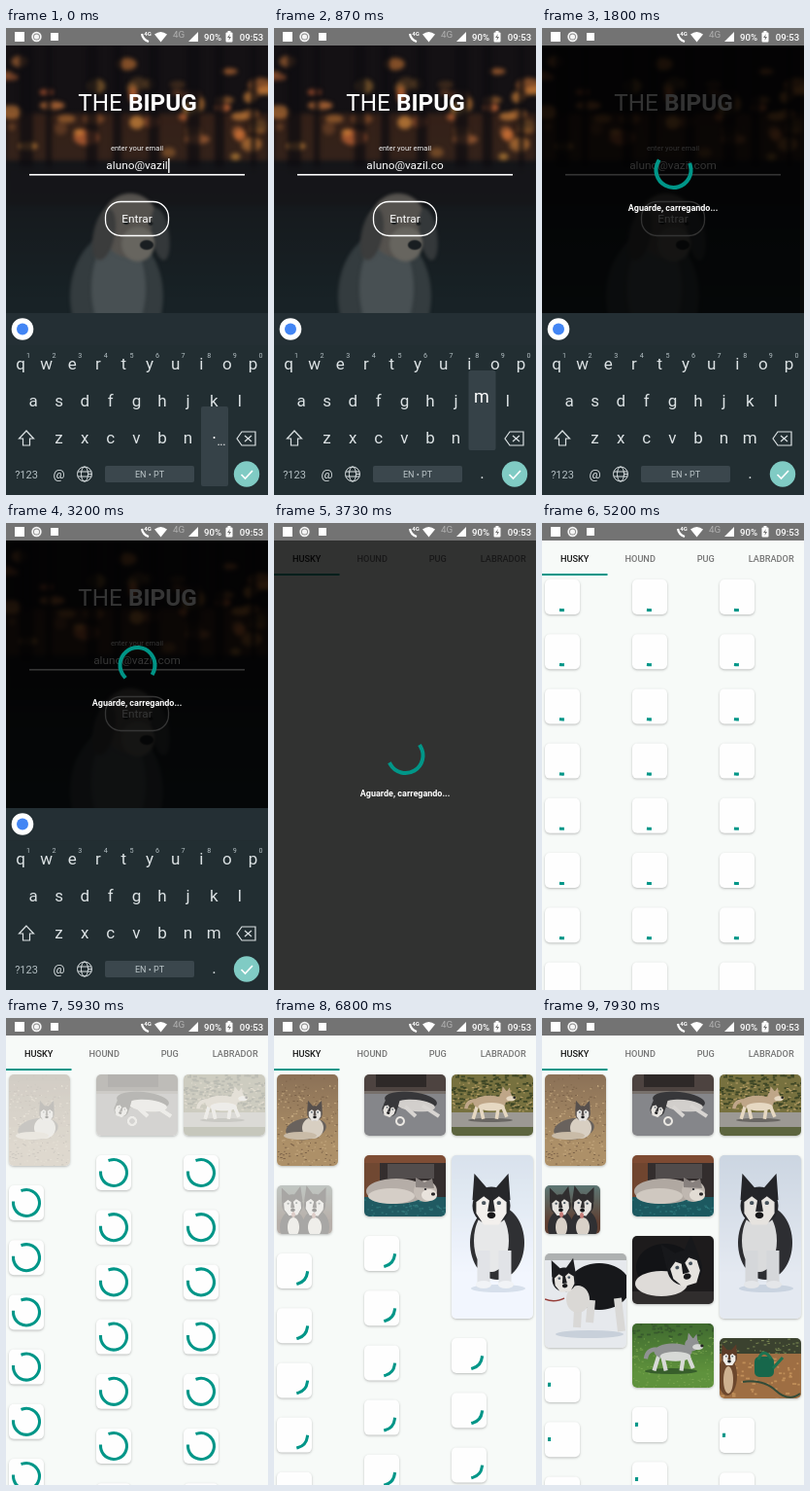
Write an HTML page with a canvas that moves like this. It is 270 by 480 pixels and loops after 8000 ms.

```html
<!DOCTYPE html>
<html lang="pt">
<head>
<meta charset="utf-8">
<title>Dog gallery</title>
<style>
html, body { margin: 0; width: 100%; height: 100%; overflow: hidden; background: #000; }
canvas { display: block; width: 270px; height: 480px; }
</style>
</head>
<body>
<canvas id="stage"></canvas>
<script>
const W = 270, H = 480, LOOP = 8000, TEAL = '#009688';
const dpr = window.devicePixelRatio || 1;
const stage = document.getElementById('stage');
stage.width = W * dpr;
stage.height = H * dpr;
const screen = stage.getContext('2d');
screen.scale(dpr, dpr);
let g = screen;

const clamp = v => Math.max(0, Math.min(1, v));
const ramp = (t, a, b) => clamp((t - a) / (b - a));

// cubic-bezier(.4, 0, .2, 1)
function ease(x) {
  let lo = 0, hi = 1;
  for (let i = 0; i < 18; i++) {
    const s = (lo + hi) / 2, r = 1 - s;
    if (1.2 * r * r * s + 0.6 * r * s * s + s * s * s < x) lo = s; else hi = s;
  }
  return lo * lo * (3 - 2 * lo);
}

function random(seed) {
  return () => (seed = (seed * 16807) % 2147483647) / 2147483647;
}

// drawing helpers
function rect(x, y, w, h, color) {
  g.fillStyle = color;
  g.fillRect(x, y, w, h);
}
function round(x, y, w, h, r, color) {
  g.beginPath();
  g.roundRect(x, y, w, h, r);
  g.fillStyle = color;
  g.fill();
}
function oval(x, y, rx, ry, color, tilt = 0) {
  g.beginPath();
  g.ellipse(x, y, rx, ry, tilt, 0, 7);
  g.fillStyle = color;
  g.fill();
}
function fillPath(d, color) {
  g.fillStyle = color;
  g.fill(new Path2D(d));
}
function line(d, color, width = 1.2) {
  g.strokeStyle = color;
  g.lineWidth = width;
  g.stroke(new Path2D(d));
}
function text(str, x, y, size, color, weight = 400, align = 'center') {
  g.font = `${weight} ${size}px Roboto, sans-serif`;
  g.textAlign = align;
  g.textBaseline = 'middle';
  g.fillStyle = color;
  g.fillText(str, x, y + 0.5);
}
function fade(top, bottom, y0, y1) {
  const grad = g.createLinearGradient(0, y0, 0, y1);
  grad.addColorStop(0, top);
  grad.addColorStop(1, bottom);
  return grad;
}
function arc(x, y, r, width, from, sweep) {
  const a = (from - 90) * Math.PI / 180;
  g.beginPath();
  g.arc(x, y, r, a, a + sweep * Math.PI / 180);
  g.lineCap = 'square';
  g.strokeStyle = TEAL;
  g.lineWidth = width;
  g.stroke();
  g.lineCap = 'butt';
}
function specks(n, color, x, y, w, h, seed, size = 2) {
  const rnd = random(seed);
  for (let i = 0; i < n; i++) rect(x + rnd() * w, y + rnd() * h, size * (0.5 + rnd()), size * 0.6, color);
}
function picture(w, h, paint) {
  const c = document.createElement('canvas');
  c.width = w * 2;
  c.height = h * 2;
  const last = g;
  g = c.getContext('2d');
  g.scale(2, 2);
  paint();
  g = last;
  return c;
}

// indeterminate ring: the head runs ahead, then the tail catches up
function ring(x, y, r, width, cycles, max, turn, offset) {
  const n = Math.floor(cycles), f = cycles - n;
  const head = max * ease(clamp(f * 2)), tail = max * ease(clamp(f * 2 - 1));
  arc(x, y, r, width, offset + turn * cycles + max * n + tail, head - tail + 3.6);
}

// login background
const photo = picture(270, 462, () => {
  rect(0, 0, 270, 462, fade('#141114', '#182226', 60, 260));
  const rnd = random(77);
  g.filter = 'blur(5px)';
  rect(0, 70, 270, 48, 'rgba(100,56,30,.4)');
  for (let i = 0; i < 46; i++) {
    const x = rnd() * 270, y = 12 + (rnd() + rnd()) * 55;
    oval(x, y, 4 + rnd() * 9, 3 + rnd() * 5, `rgba(${185 + rnd() * 45 | 0},${105 + rnd() * 35 | 0},58,${0.2 + rnd() * 0.6})`);
  }
  for (let i = 0; i < 8; i++) rect(i * 35 + rnd() * 14, 0, 5 + rnd() * 9, 130, 'rgba(14,12,16,.75)');
  rect(0, 124, 270, 40, 'rgba(22,22,25,.8)');
  g.filter = 'blur(3px)';
  oval(114, 258, 48, 66, '#343c3f');
  oval(116, 250, 28, 55, '#485053');
  oval(128, 185, 30, 33, '#55524e');
  oval(101, 194, 11, 27, '#3b3c3c', 0.2);
  oval(159, 194, 9, 27, '#34383a', -0.15);
  oval(136, 204, 17, 18, '#67655f');
  g.filter = 'blur(1px)';
  oval(145, 205, 7, 5, '#191e21');
  oval(124, 182, 3, 2, '#1a1d1f');
  oval(149, 183, 2.5, 2, '#1a1d1f');
  g.filter = 'none';
});

// thumbnails
function face(x, y, s, dark = '#292a2d', tilt = 0) {
  g.save();
  g.translate(x, y);
  g.rotate(tilt);
  g.scale(s, s);
  fillPath('M-10-3L-9-17L-2-9L2-9L9-17L10-3Z', dark);
  oval(0, 0, 10, 10, dark);
  fillPath('M0-2L4-5L8-2L8 4L4 10L-4 10L-8 4L-8-2L-4-5Z', '#e6e3df');
  fillPath('M0-9L2 3L-2 3Z', dark);
  oval(-4, -1.5, 1.1, 1, '#46525c');
  oval(4, -1.5, 1.1, 1, '#46525c');
  oval(0, 5, 2.2, 1.7, '#18181a');
  g.restore();
}
function walker(x, y, s, coat, belly) {
  g.save();
  g.translate(x, y);
  g.scale(s, s);
  line('M-12 3L-16 16M-9 3L-6 16M9 3L7 16M12 2L17 14', belly, 3.4);
  oval(0, 0, 16, 7, coat);
  oval(2, 4, 13, 4, belly);
  line('M-14-2Q-22-2-23 6', coat, 3.5);
  oval(16, -6, 6, 5.5, coat);
  fillPath('M12-9L13-16L17-11L20-15L21-7Z', coat);
  oval(21, -4, 4.5, 2.5, belly);
  oval(24.5, -5, 1.3, 1.2, '#242424');
  g.restore();
}

const paints = {
  field() {
    rect(0, 0, 63, 94, fade('#8b7157', '#ad9068', 0, 70));
    specks(150, '#c6aa80', 0, 10, 63, 84, 5, 1.6);
    specks(130, '#7a6148', 0, 0, 63, 94, 9, 1.6);
    oval(30, 56, 21, 11, '#69625d', -0.15);
    oval(37, 55, 11, 11, '#d8cfc2');
    oval(24, 63, 17, 4, '#c9bba7');
    face(39, 40, 0.78, '#57504d');
  },
  floor() {
    rect(0, 0, 84, 63, '#85868a');
    rect(0, 0, 84, 20, '#4d4340');
    rect(12, 0, 52, 13, '#2e2928');
    rect(0, 17, 84, 3, '#77706b');
    oval(48, 27, 27, 9, '#37373a', 0.1);
    oval(53, 32, 20, 6, '#d2cfcc', 0.1);
    line('M60 32L77 43M42 33L53 43', '#d8d5d2', 4);
    face(26, 36, 0.75, '#37373a', 0.35);
    g.beginPath();
    g.arc(37, 48, 4, 0, 7);
    g.strokeStyle = '#ece9e4';
    g.lineWidth = 2;
    g.stroke();
  },
  road() {
    rect(0, 0, 84, 63, '#77713f');
    specks(150, '#3f4726', 0, 0, 84, 34, 11, 3);
    specks(100, '#b39c64', 0, 8, 84, 32, 18, 2);
    rect(0, 39, 84, 24, '#9c9994');
    rect(0, 54, 84, 9, '#5d653f');
    oval(40, 47, 23, 2, '#696663');
    walker(39, 29, 1.05, '#bfa688', '#e6d8c2');
  },
  sofa() {
    rect(0, 0, 84, 63, '#332d2d');
    rect(0, 0, 84, 8, '#7d4a32');
    rect(0, 8, 16, 37, '#70452f');
    rect(24, 9, 48, 15, '#504b4b');
    rect(0, 43, 84, 20, '#1c5960');
    specks(60, '#2c7579', 0, 45, 84, 18, 23);
    oval(33, 37, 31, 13, '#b0a8a1');
    oval(28, 42, 24, 8, '#cfc8c0');
    oval(63, 37, 12, 11, '#bfb7b0');
    fillPath('M53 33L53 23L62 28L70 24L72 34Z', '#88817e');
    oval(67, 41, 8, 6, '#e2dcd4');
    oval(71, 40, 2, 1.6, '#272527');
    oval(63, 35, 1.2, 1, '#29292d');
  },
  snow() {
    rect(0, 0, 84, 168, fade('#ccd6e2', '#e4e9f1', 0, 120));
    oval(48, 137, 28, 4, '#c9d3e0');
    oval(47, 90, 28, 38, '#2d2e32');
    oval(41, 88, 18, 32, '#dadbdc');
    line('M33 98L33 132M55 98L55 132', '#d5d7da', 13);
    oval(33, 133, 8, 4, '#e4e6e9');
    oval(56, 133, 8, 4, '#e4e6e9');
    face(41, 52, 1.95, '#242529');
  },
  pair() {
    rect(0, 0, 57, 50, fade('#5d7775', '#5f3f32', 0, 38));
    oval(16, 43, 13, 17, '#303033');
    oval(40, 43, 14, 18, '#303033');
    oval(17, 43, 6, 10, '#d9d1c8');
    oval(39, 43, 7, 10, '#d9d1c8');
    face(16, 20, 1.08, '#302e2f', -0.08);
    face(39, 20, 1.12, '#302e2f', 0.08);
    oval(17, 30, 2, 3, '#c77d79');
    oval(38, 31, 2, 3, '#c77d79');
  },
  winter() {
    rect(0, 0, 84, 97, '#e6e9ed');
    rect(0, 0, 84, 7, '#aeb1b1');
    oval(46, 83, 35, 4, '#c8d0da');
    oval(56, 34, 32, 24, '#17181b');
    line('M35 40L33 76M48 48L46 71M75 46L79 80', '#d9d8d6', 8);
    oval(34, 47, 12, 14, '#dad8d5');
    face(20, 27, 1.25, '#1c1d20', -0.1);
    line('M0 47Q10 51 20 46', '#963d38', 1.5);
  },
  puppy() {
    rect(0, 0, 84, 70, '#1d1b1c');
    rect(0, 57, 84, 13, '#302d2d');
    oval(34, 32, 30, 24, '#121316');
    oval(30, 49, 27, 13, '#dedbd8');
    face(54, 33, 1.8, '#17181b', -0.3);
  },
  grass() {
    rect(0, 0, 84, 66, fade('#3d6a2c', '#5b9038', 0, 50));
    specks(150, '#76a34b', 0, 14, 84, 52, 41, 1.5);
    specks(45, '#35582a', 0, 0, 84, 13, 42, 3);
    oval(40, 49, 27, 3, '#355d29');
    walker(42, 29, 1.22, '#8d8f90', '#d3d5d2');
  },
  garden() {
    rect(0, 0, 84, 62, '#9c693c');
    specks(55, '#bd8850', 0, 20, 84, 42, 51, 3);
    rect(0, 0, 84, 16, '#39402d');
    specks(50, '#6f7d48', 0, 0, 84, 16, 52, 2);
    oval(8, 39, 10, 20, '#6b4429');
    oval(9, 43, 5, 14, '#c9ab88');
    face(10, 20, 0.8, '#5c3a25');
    round(36, 19, 20, 21, 5, '#126648');
    line('M40 22Q45 9 53 21M55 31L65 20', '#16724e', 3);
    line('M24 45Q45 42 58 54T83 57', '#2f4a36', 2);
  }
};

const shot = (name, w, h, at) => ({ w, h, at, img: picture(w, h, paints[name]) });
const columns = [
  [shot('field', 63, 94, 5790), shot('pair', 57, 50, 6620), shot('winter', 84, 97, 6850)],
  [shot('floor', 84, 63, 5790), shot('sofa', 84, 63, 6000), shot('puppy', 84, 70, 6920), shot('grass', 84, 66, 7100)],
  [shot('road', 84, 63, 5790), shot('snow', 84, 168, 6080), shot('garden', 84, 62, 7150)]
];

function statusBar() {
  rect(0, 0, W, 18, '#737373');
  rect(9, 4, 10, 10, '#fff');
  oval(31.5, 9, 5.2, 5.2, '#f4f4f4');
  oval(31.5, 9, 3.5, 3.5, '#8a8a8a');
  oval(31.5, 9, 2.6, 2.6, '#f4f4f4');
  rect(46, 5, 8, 8, '#fff');
  line('M140 6Q141 12 147 14', '#fff', 2.2);
  text('4G', 146, 6, 6, '#fff', 700);
  fillPath('M153 6.5Q159.5 1.5 166 6.5L159.5 14.5Z', '#fff');
  text('4G', 178, 6.5, 9.8, '#b0b0b0');
  fillPath('M188 14L198 4V14Z', '#fff');
  text('90%', 213, 9.3, 9.6, '#fff', 500);
  round(226.5, 4.5, 7, 10, 1, '#fff');
  rect(228.5, 3, 3, 2, '#fff');
  fillPath('M231 6L228 10H230L229.5 13L232 9H230Z', '#737373');
  text('09:53', 253, 9.3, 9.6, '#fff', 500);
}

function title(first, second, y, size) {
  g.font = `400 ${size}px Roboto, sans-serif`;
  const a = g.measureText(first).width;
  g.font = `700 ${size}px Roboto, sans-serif`;
  const x = 135.5 - (a + g.measureText(second).width) / 2;
  text(first, x, y, size, '#fff', 400, 'left');
  text(second, x + a, y, size, '#fff', 700, 'left');
}

const typed = [['.', 140], ['c', 420], ['o', 650], ['m', 890]];

function login(t) {
  g.drawImage(photo, 0, 18, 270, 462);
  title('THE ', 'BIPUG', 77.5, 24.3);
  text('enter your email', 135, 123, 7.6, '#f2f2f2');
  const mail = 'aluno@vazil' + typed.filter(k => t >= k[1]).map(k => k[0]).join('');
  text(mail, 135, 141.5, 11.8, '#fff');
  const half = g.measureText(mail).width / 2;
  if (t < 1200 && t % 1000 < 500) rect(135.5 + half, 134, 1.4, 15, '#fff');
  rect(24, 150, 222, 1.6, '#fff');
  const press = ramp(t, 1130, 1250) * (1 - ramp(t, 1250, 1400));
  g.beginPath();
  g.roundRect(102.5, 178.5, 65, 35, 16);
  g.fillStyle = `rgba(255,255,255,${press * 0.3})`;
  g.fill();
  g.strokeStyle = '#fff';
  g.lineWidth = 1.3;
  g.stroke();
  text('Entrar', 135, 196, 11.8, '#fff');
}

const rows = [['qwertyuiop', 15, 345], ['asdfghjkl', 28, 383], ['zxcvbnm', 54.5, 421]];

function preview(ch, x, y) {
  round(x - 13.5, y - 30, 28, 82, 2, '#364248');
  text(ch, x, y - 3, 18, '#fff');
}

function keyboard(t) {
  const ink = '#dce2e4', soft = '#b4bfc3';
  rect(0, 293, W, 187, '#222e32');
  rect(0, 293, W, 33, '#242f34');
  oval(17, 309.5, 11.3, 11.3, '#fff');
  oval(17, 309.5, 6, 6, '#4285f4');
  rows.forEach(([keys, x, y], r) => [...keys].forEach((ch, i) => {
    text(ch, x + i * 26.6, y + 0.3, 17, ink);
    if (!r) text((i + 1) % 10, x + 8 + i * 26.6, 336, 7.2, soft);
  }));
  line('M21 414L13.5 422H17.5V429H24.5V422H28.5Z', ink);
  line('M238 422L243 415H257V429H243ZM246 419L253 425M253 419L246 425', ink);
  text('?123', 21, 459, 11, soft);
  text('@', 54.5, 459, 13.5, ink);
  g.beginPath();
  g.arc(81, 458.5, 7.5, 0, 7);
  g.ellipse(81, 458.5, 3.5, 7.5, 0, 0, 7);
  g.strokeStyle = ink;
  g.lineWidth = 1;
  g.stroke();
  line('M74 456H88M74 461H88', ink, 1);
  round(102, 450, 92, 17, 2, '#3b474d');
  text('EN • PT', 148, 458.5, 9, '#bcc6c9');
  text('.', 214.5, 457, 17, ink);
  oval(248, 458.5, 13.2, 13.2, '#80cbc4');
  line('M242.5 459L246.5 463L254 455', '#fff', 1.7);

  if (t < 140) {
    preview('.', 214.5, 419);
    text('...', 222, 426, 10, '#fff', 500);
  }
  const at = { c: [107.7, 382], o: [228, 306], m: [214, 382] };
  for (const [ch, when] of typed.slice(1)) {
    if (t >= when - 60 && t < when + 70) preview(ch, ...at[ch]);
  }
}

function dialog(t, start, y, alpha) {
  rect(0, 18, W, 462, `rgba(0,0,0,${0.8 * alpha})`);
  g.save();
  g.globalAlpha *= alpha;
  ring(135.5, y, 18, 4, Math.max(0, t - start) / 1333, 270, 234, 10);
  text('Aguarde, carregando...', 135, y + 39, 9, '#fff', 700);
  g.restore();
}

function card(x, y, w, h) {
  g.save();
  g.shadowColor = 'rgba(0,0,0,.25)';
  g.shadowBlur = 2.5 * dpr;
  g.shadowOffsetY = dpr;
  round(x, y, w, h, 5, '#fefefe');
  g.restore();
}

function thumb(s, x, y, t) {
  const u = clamp((t - s.at) / 900);
  card(x, y, s.w, s.h);
  g.save();
  g.beginPath();
  g.roundRect(x, y, s.w, s.h, 5);
  g.clip();
  rect(x, y, s.w, s.h, '#e6e5e0');
  g.globalAlpha = Math.min(1, u * 1.8);
  if (u < 1) g.filter = `saturate(${0.35 + 0.65 * u}) brightness(${1.3 - 0.3 * u})`;
  g.drawImage(s.img, x, y, s.w, s.h);
  g.restore();
}

function gallery(t) {
  rect(0, 18, W, 462, '#f7faf8');
  ['HUSKY', 'HOUND', 'PUG', 'LABRADOR'].forEach((name, i) =>
    text(name, 33.7 + i * 67.5, 36.3, 9.2, i ? '#757575' : '#161616', 500));
  rect(0, 52, 67.5, 2, TEAL);
  if (t < 3975) return;
  const cycles = (t - 3975) / 1332;
  columns.forEach((shots, i) => {
    const x = 3 + i * 90;
    let y = 58;
    for (const s of shots) {
      if (t < s.at) break;
      thumb(s, x, y, t);
      y += s.h + 20;
    }
    for (; y < H; y += 56.2) {
      card(x, y, 36, 36);
      ring(x + 18, y + 18, 13.5, 3.1, cycles, 284.4, 291.6, -10);
    }
  });
}

function draw(t) {
  rect(0, 0, W, H, '#000');
  if (t < 3500) {
    login(t);
    const shade = ramp(t, 1440, 1620) * (1 - ramp(t, 3200, 3330));
    if (shade) dialog(t, 1440, 146, shade);
    g.save();
    g.translate(0, 187 * ease(ramp(t, 3200, 3400)));
    keyboard(t);
    g.restore();
  }
  if (t >= 3330) {
    const enter = ease(ramp(t, 3330, 3480));
    g.save();
    g.globalAlpha = enter;
    g.translate(0, 30 * (1 - enter));
    gallery(t);
    g.restore();
    const shade = ramp(t, 3450, 3590) * (1 - ramp(t, 3930, 4040));
    if (shade) dialog(t, 3450, 239, shade);
  }
  statusBar();
}

function tick() {
  draw(performance.now() % LOOP);
  requestAnimationFrame(tick);
}
tick();
</script>
</body>
</html>
```
